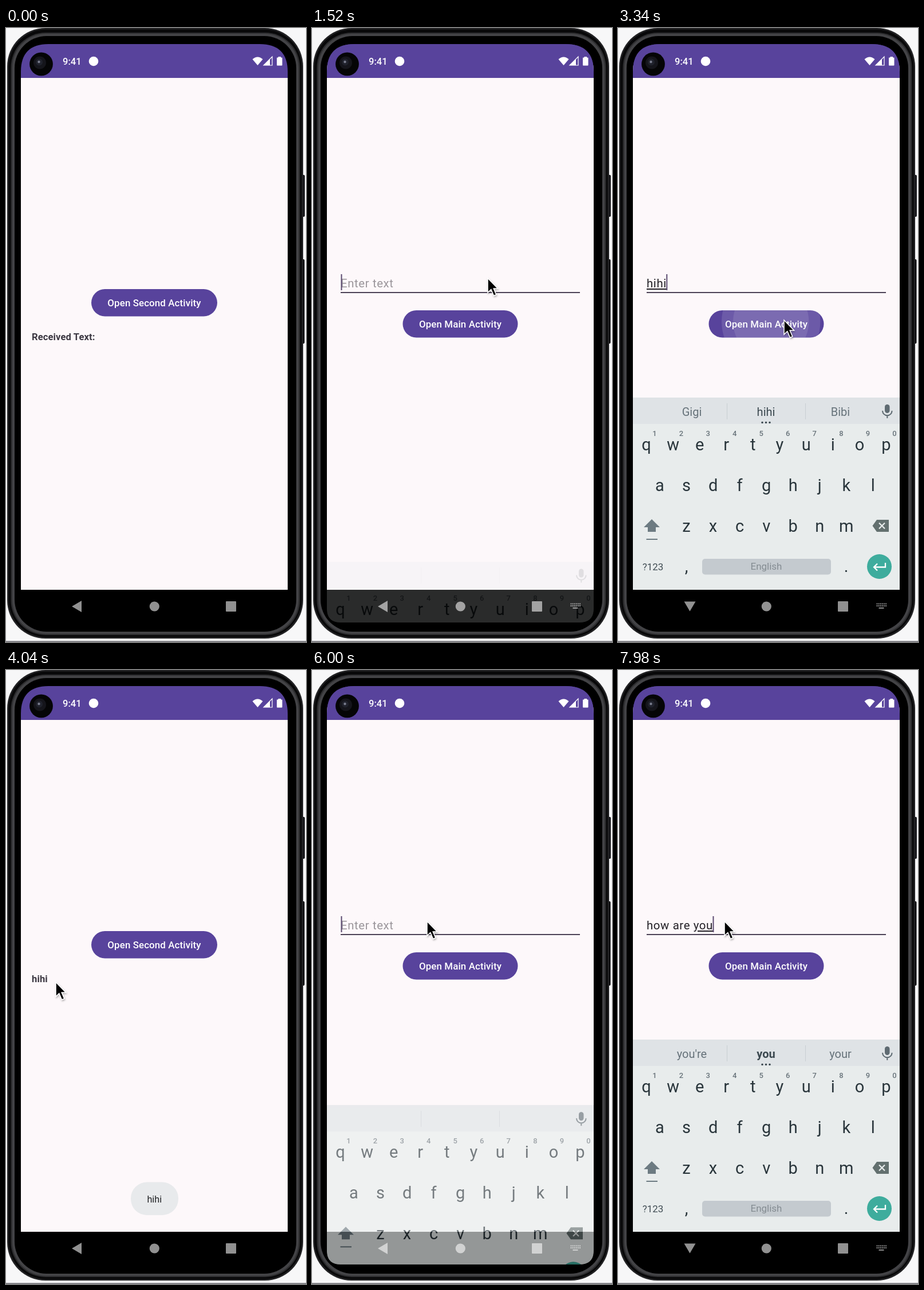
An HTML page that plays this animation: 524x1070 px, repeating every 8000 ms.

```html
<!DOCTYPE html>
<html lang="en">
<head>
<meta charset="utf-8">
<title>Two activities</title>
<style>
  html, body { margin: 0; width: 100%; height: 100%; overflow: hidden; background: #f7f7f8; }
  svg { display: block; width: 524px; height: 1070px; font-family: Roboto, sans-serif; }
  text { white-space: pre; }
  .mid { text-anchor: middle; }
  .label { font-size: 16.9px; font-weight: 500; letter-spacing: .1px; fill: #fff; text-anchor: middle; }
  .field { font-size: 20.39px; letter-spacing: .03em; }
  .key { font-size: 29px; fill: #29353b; text-anchor: middle; }
  .hint { font-size: 13px; font-weight: 500; fill: #68737a; text-anchor: middle; }
  .word { font-size: 20px; fill: #66727a; text-anchor: middle; }
</style>
</head>
<body>
<svg id="stage" viewBox="0 0 524 1070" xmlns="http://www.w3.org/2000/svg"></svg>
<script>
const LOOP = 8000, PURPLE = '#58439c', PAPER = '#fdf8fa', KEYS = '#e8ecec';
const stage = document.getElementById('stage');

const rect = (x, y, w, h, fill, r = 0, extra = '') =>
  `<rect x="${x}" y="${y}" width="${w}" height="${h}" rx="${r}" fill="${fill}" ${extra}/>`;
const circle = (x, y, r, fill, extra = '') =>
  `<circle cx="${x}" cy="${y}" r="${r}" fill="${fill}" ${extra}/>`;
const path = (d, fill, extra = '') => `<path d="${d}" fill="${fill}" ${extra}/>`;
const text = (x, y, cls, str, extra = '') =>
  `<text x="${x}" y="${y}" class="${cls}" ${extra}>${str}</text>`;

const windowBase = () =>
  rect(26, 28, 466, 59, PURPLE) + rect(26, 87, 466, 892, PAPER) + rect(26, 979, 466, 57, '#000');

const button = (id, x, y, w, label) => `
  <clipPath id="${id}Clip">${rect(x, y, w, 47.5, '#000', 23.75)}</clipPath>
  ${rect(x, y, w, 47.5, PURPLE, 23.75)}
  <g id="${id}Ripple" clip-path="url(#${id}Clip)">
    ${circle(0, 0, 0, '#fff', 'opacity=".12"')}${circle(0, 0, 0, '#fff', 'opacity=".1"')}
  </g>
  ${text(259, y + 30, 'label', label)}`;

const keyRow = (letters, x, y) =>
  [...letters].map((c, i) => text(x + i * 46.55, y, 'key', c)).join('');

const mic = `<g fill="#5f6b72">${rect(466, 656, 8.5, 15, '#5f6b72', 4.2)}
  ${path('M462 667a8.3 8.3 0 0 0 16.6 0M470.3 675v5', 'none', 'stroke="#5f6b72" stroke-width="2"')}</g>`;

const keyboard = `
  ${rect(26, 644, 466, 335, KEYS)}
  ${rect(26, 644, 466, 46, '#dfe3e6')}
  ${rect(190, 654, 1, 28, '#c9ced2')}${rect(327, 654, 1, 28, '#c9ced2')}
  ${[129, 258.5, 388.5].map((x, i) => text(x, 676, 'word', '', `id="word${i}"`)).join('')}
  <g id="dots">${[252, 258.5, 265].map(x => circle(x, 687.5, 1.7, '#39464d')).join('')}</g>
  ${mic}
  ${keyRow('qwertyuiop', 49.5, 736)}
  ${[...'1234567890'].map((c, i) => text(64 + i * 46.55, 711, 'hint', c)).join('')}
  ${keyRow('asdfghjkl', 73, 807)}
  ${keyRow('zxcvbnm', 119.5, 878)}
  ${path('M59 856L73 870H66V878H52V870H45Z', '#6d7b82')}${rect(49.5, 890, 19.5, 2, '#6d7b82')}
  ${path('M452 857H473V878H452L444.5 867.5Z', '#63706f')}
  ${path('M456 862.5l10 10m0-10l-10 10', 'none', `stroke="${KEYS}" stroke-width="2.2"`)}
  ${text(61, 944.5, 'mid', '?123', 'font-size="17" fill="#414d54"')}
  ${text(119.5, 948, 'key', ',')}${text(398.5, 948, 'key', '.')}
  ${rect(147, 925, 225, 27.5, '#c4cacf', 5)}
  ${text(259, 944, 'mid', 'English', 'font-size="17" fill="#848c92"')}
  ${circle(456.5, 938.5, 21.5, '#3eac9d')}
  ${path('M467 932v7.5H447m6-6l-6 6 6 6', 'none', 'stroke="#fff" stroke-width="2.3"')}
  ${rect(26, 979, 466, 57, '#000')}`;

const keyboardIcon = [0, 1].map(row => [0, 1, 2, 3, 4, 5].map(col =>
  rect(451.5 + col * 3.1, 1002.5 + row * 3.5, 2, 2, '#fff')
).join('')).join('') + rect(455.5, 1009.8, 9, 2, '#fff');

stage.innerHTML = `
  <defs>
    <clipPath id="screen"><path d="M26 76Q26 28 74 28H443Q492 28 492 76V1012Q492 1036 467 1036H50Q26 1036 26 1012Z"/></clipPath>
    <filter id="soft" x="-50%" y="-50%" width="200%" height="200%"><feDropShadow dx="1" dy="2" stdDeviation="1.5" flood-opacity=".3"/></filter>
  </defs>
  ${rect(0, 0, 524, 1070, '#f7f7f8')}
  ${rect(0, 1068, 524, 2, '#85858a')}
  ${rect(515, 256, 7, 73, '#18181c', 2)}${rect(515, 403, 6.5, 147, '#0c0c0e', 2)}
  ${rect(2, 0, 517, 1064, '#222224', 67)}
  ${rect(4.5, 2.5, 512, 1059, '#080809', 65)}
  ${rect(8.5, 8, 505, 1050, '#2e2e30', 61)}
  ${rect(11, 10, 500, 1046, '#434346', 59)}
  ${rect(15, 14, 492, 1038, '#000', 56)}
  <g clip-path="url(#screen)">
    ${rect(26, 28, 466, 1008, '#000')}
    <g id="main">
      ${windowBase()}
      ${button('first', 149, 455, 220, 'Open Second Activity')}
      ${text(45, 544, '', '', 'id="received" font-size="16.6" font-weight="700" letter-spacing=".1" fill="#3c3842"')}
      ${rect(26, 28, 466, 951, '#000', 0, 'id="scrim"')}
    </g>
    <g id="second">
      ${windowBase()}
      ${text(50, 452, 'field', 'Enter text', 'id="placeholder" fill="#9b969b"')}
      ${text(50, 452, 'field', '<tspan id="done"></tspan><tspan id="composing" text-decoration="underline"></tspan>', 'id="typed" fill="#242127"')}
      ${rect(50, 460, 418, 2, '#4c4356', 0, 'id="line"')}
      ${rect(50.5, 429, 2, 28, '#5b4a70', 0, 'id="caret"')}
      ${button('back', 158.5, 492, 201, 'Open Main Activity')}
    </g>
    <g id="keyboard">${keyboard}</g>
    <g id="toast">
      ${rect(218, 892.5, 83, 57.5, '#e8eaec', 28)}
      ${text(259.3, 928, 'mid', 'hihi', 'font-size="16.2" fill="#202124"')}
    </g>
    ${text(99, 64, '', '9:41', 'font-size="16.6" font-weight="500" fill="#fff"')}
    ${circle(153, 58, 8.3, '#fff')}
    ${path('M430.5 54.5Q439.5 46.5 448.5 54.5L439.5 65Z', '#fff')}
    ${path('M465 50V65H450Z', 'none', 'stroke="#fff" stroke-width="1.2"')}
    ${path('M461 54V65H450Z', '#fff')}
    ${rect(473, 51.5, 9.5, 14, '#fff', 1)}${rect(475.5, 50, 4.5, 3, '#fff')}
    <g fill="#fff" opacity=".57">
      <path id="navBack" d="M115 1008L132 998V1018Z"/>
      ${circle(259.3, 1008, 8.6, '#fff')}${rect(384, 999, 18, 18, '#fff', 1)}
      <g id="navKeys">${keyboardIcon}</g>
    </g>
  </g>
  ${circle(61.5, 62.8, 20.4, '#050506')}
  ${circle(59, 60.5, 11, '#15151b')}${circle(58, 59.5, 6, '#20222c')}${circle(57.5, 59, 2.2, '#777b8b')}
  <g id="pointer" filter="url(#soft)">
    ${path('M0 0V25L5.8 19.5L10.5 30.5L14.8 28.6L10.2 18H17.5Z', '#000', 'stroke="#fff" stroke-width="1.5"')}
  </g>`;

const el = {};
stage.querySelectorAll('[id]').forEach(node => el[node.id] = node);

const clamp = v => Math.max(0, Math.min(1, v));
const ramp = (t, start, length) => clamp((t - start) / length);
const mix = (a, b, p) => a + (b - a) * p;
const set = (node, attrs) => { for (const k in attrs) node.setAttribute(k, attrs[k]); };
const show = (node, opacity) => set(node, { opacity, visibility: opacity > 0 ? 'visible' : 'hidden' });

// Solves a cubic segment between two points for y at a given x.
function bezier(x, [x0, y0], [x1, y1], [x2, y2], [x3, y3]) {
  const at = (a, b, c, d, u) => a * (1 - u) ** 3 + 3 * b * u * (1 - u) ** 2 + 3 * c * u * u * (1 - u) + d * u ** 3;
  if (x <= x0) return y0;
  if (x >= x3) return y3;
  let low = 0, high = 1;
  for (let i = 0; i < 24; i++) {
    const u = (low + high) / 2;
    if (at(x0, x1, x2, x3, u) < x) low = u; else high = u;
  }
  return at(y0, y1, y2, y3, low);
}
const standard = p => bezier(p, [0, 0], [.4, 0], [.2, 1], [1, 1]);
const emphasized = p => p < 1 / 6
  ? bezier(p, [0, 0], [.05, 0], [.1333, .06], [1 / 6, .4])
  : bezier(p, [1 / 6, .4], [.2083, .82], [.25, 1], [1, 1]);
const smooth = p => p * p * (3 - 2 * p);

// time, x, y of the pointer tip
const POINTER = [
  [60, 540, 640], [480, 301, 479], [900, 301, 479], [1300, 307, 436], [2920, 307, 436],
  [3220, 290, 509], [3520, 290, 509], [3960, 87, 544], [4480, 87, 544], [4960, 196, 494],
  [5420, 196, 494], [5780, 201, 438], [6200, 201, 438], [6500, 186, 438]
];

// One visit to the second screen: opening, focus, typing, closing.
const VISITS = [
  { press: 560, open: 690, focus: 1440, keys: 1446, close: 3420, words: 'hihi', times: i => 2200 + i * 220 },
  { press: 5060, open: 5170, focus: 5860, keys: 5872, close: Infinity, words: 'how are you', times: i => 6560 + i * 130 }
];

const SUGGESTIONS = {
  h: ['he', 'h', 'have'], hi: ['his', 'hi', 'him'], hih: ['hug', 'hih', 'high'], hihi: ['Gigi', 'hihi', 'Bibi'],
  ho: ['how', 'ho', 'home'], how: ["how's", 'how', 'however'], a: ['and', 'a', 'at'], ar: ['are', 'ar', 'art'],
  are: ["aren't", 'are', 'area'], y: ['you', 'y', 'yes'], yo: ['you', 'yo', 'your'], you: ["you're", 'you', 'your']
};

function scale(node, s) {
  set(node, { transform: `translate(259 532) scale(${s}) translate(-259 -532)` });
}

function ripple(group, t, start, x, y, cy) {
  const grow = ramp(t, start, 260);
  show(group, t < start ? 0 : 1 - ramp(t, start + 260, 200));
  [...group.children].forEach((ring, i) =>
    set(ring, { cx: mix(x, 259, grow ** .4), cy: mix(y, cy, grow), r: 35 + 110 * grow - i * 20 }));
}

function drawPointer(t) {
  show(el.pointer, t < POINTER[0][0] ? 0 : 1);
  const i = POINTER.findLastIndex(k => k[0] <= t);
  const a = POINTER[Math.max(0, i)], b = POINTER[Math.min(POINTER.length - 1, i + 1)];
  const p = a === b ? 0 : smooth(ramp(t, a[0], b[0] - a[0]));
  set(el.pointer, { transform: `translate(${mix(a[1], b[1], p)} ${mix(a[2], b[2], p)})` });
}

function drawWindows(t, v) {
  const entering = emphasized(ramp(t, v.open, 450));
  const leaving = emphasized(ramp(t, v.close, 450));
  const closing = t >= v.close;
  scale(el.main, closing ? mix(1.05, 1, leaving) : mix(1, 1.05, entering));
  scale(el.second, closing ? mix(1, .9, leaving) : mix(.85, 1, entering));
  show(el.second, closing ? 1 - ramp(t, v.close + 35, 83) : ramp(t, v.open + 45, 80));
  show(el.scrim, .15 * (closing ? 1 - leaving : entering));
  el.received.textContent = t < VISITS[0].close ? 'Received Text:' : 'hihi';
  show(el.toast, ramp(t, 3600, 220) * (1 - ramp(t, 4980, 180)));
}

function drawField(t, v) {
  const count = [...v.words].filter((_, i) => v.times(i) <= t).length;
  const typed = v.words.slice(0, count);
  const split = typed.lastIndexOf(' ') + 1;
  const word = typed.slice(split);
  el.done.textContent = typed.slice(0, split);
  el.composing.textContent = word;
  show(el.placeholder, count ? 0 : 1);

  const focused = t >= v.focus;
  set(el.line, { height: focused ? 2 : 1.2 });
  const since = t - (count ? v.times(count - 1) : v.focus);
  show(el.caret, focused && since % 1000 < 500 ? 1 : 0);
  set(el.caret, { x: count ? 49.5 + el.typed.getComputedTextLength() : 50.5 });

  const list = SUGGESTIONS[word] || ['', '', ''];
  list.forEach((s, i) => el['word' + i].textContent = s);
  set(el.word1, { 'font-weight': word && word !== 'hihi' ? 700 : 400, style: 'fill: #3c4950' });
  show(el.dots, word ? 1 : 0);
}

function drawKeyboard(t, v) {
  const p = standard(ramp(t, v.keys, 285)) * (1 - standard(ramp(t, v.close, 220)));
  set(el.keyboard, { transform: `translate(0 ${392 * (1 - p)})` });
  show(el.keyboard, p ** 1.3);
  show(el.navKeys, p > 0 ? 1 : 0);
  const turn = smooth(ramp(t, v.keys + 200, 200)) * (1 - smooth(ramp(t, v.close, 200)));
  set(el.navBack, { transform: `rotate(${-90 * turn} 124.5 1007)` });
}

function draw(t) {
  const visit = t < 4500 ? VISITS[0] : VISITS[1];
  drawWindows(t, visit);
  drawField(t, visit);
  drawKeyboard(t, visit);
  ripple(el.firstRipple, t, visit.press, visit === VISITS[0] ? 300 : 195, 482, 479);
  ripple(el.backRipple, t, 3220, 290, 508, 516);
  drawPointer(t);
}

const begin = performance.now();
function tick() {
  draw((performance.now() - begin) % LOOP);
  requestAnimationFrame(tick);
}
tick();
</script>
</body>
</html>
```
